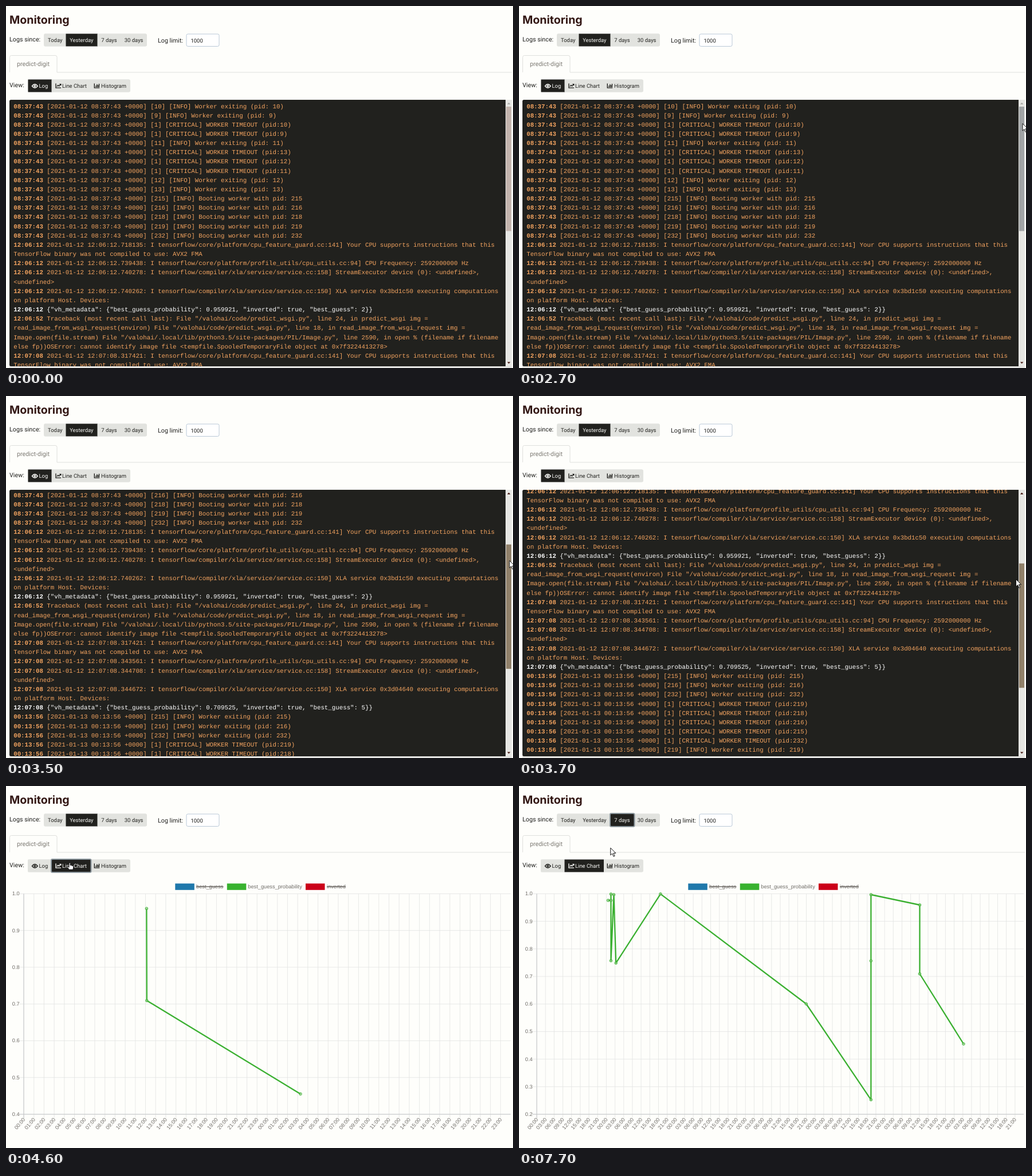
Animation, 885 px wide and 633 px high, one loop 8000 ms. Source, as an HTML page:

```html
<!DOCTYPE html>
<html lang="en">
<head>
<meta charset="utf-8">
<title>Monitoring</title>
<style>
html, body { margin: 0; width: 100%; height: 100%; overflow: hidden; background: #fefefb; }
svg { display: block; position: absolute; left: 0; top: 0; }
text { font-family: Roboto, sans-serif; font-size: 10.75px; fill: #1f1f1d; text-rendering: geometricPrecision; white-space: pre; }
.title { font: 700 19.6px Inter, sans-serif; fill: #331714; }
.muted { fill: #7c7973; }
.btn { color: #22221f; }
.btn rect { fill: #e2e3df; }
.btn text, .input { font-size: 9.45px; }
.btn text { fill: currentColor; }
.btn .ring { fill: none; stroke: #8d989e; stroke-width: 2; visibility: hidden; }
.btn.hover rect { fill: #cad1d5; }
.btn.active { color: #fafaf7; }
.btn.active rect { fill: #21211e; }
.btn .ring.ring { fill: none; }
.btn.focus .ring { visibility: visible; }
.log text { font-family: "Liberation Mono", monospace; font-size: 10.78px; fill: #f4a460; }
.log .out { fill: #fff; }
.log tspan { font-weight: 700; }
.chart text { font-family: "Liberation Sans", Arial, sans-serif; font-size: 9.24px; fill: #706d69; }
.grid { stroke: #e2e4e2; stroke-width: .8; fill: none; }
.axis { stroke: #c3c6c8; stroke-width: 1; fill: none; }
.icon { fill: none; stroke: currentColor; stroke-width: 1.4; }
</style>
</head>
<body>
<svg id="stage" width="885" height="633" viewBox="0 0 885 633">
  <defs><clipPath id="view"><rect x="6" y="164" width="866" height="466"/></clipPath></defs>
  <text class="title" x="6" y="31.3">Monitoring</text>
  <text x="6" y="62.3">Logs since:</text>
  <text x="265" y="63.6">Log limit:</text>
  <rect x="315" y="49" width="57" height="21.5" rx="2.5" fill="#fff" stroke="#b9c8d8"/>
  <text class="input" x="322.5" y="63.8">1000</text>
  <path d="M6.5 116V89.5q0-3 3-3H86q3 0 3 3V116H883" fill="none" stroke="#dfe0dd"/>
  <text class="muted" x="19" y="105.4">predict-digit</text>
  <text x="6" y="141.6">View:</text>
</svg>
<script>
const LOOP = 8000, STEP = 100, BASE = 574, LEFT = 31, RIGHT = 881, TOP = 188.4;
const stage = document.getElementById('stage');

function el(tag, attrs, parent = stage, text) {
  const node = document.createElementNS('http://www.w3.org/2000/svg', tag);
  for (const k in attrs) node.setAttribute(k, attrs[k]);
  if (text !== undefined) node.textContent = text;
  parent.appendChild(node);
  return node;
}
const show = (node, on) => node.setAttribute('visibility', on ? 'visible' : 'hidden');

// Buttons
function button(x, y, w, label, tx, icon) {
  const g = el('g', { class: 'btn' });
  el('rect', { x, y, width: w, height: 22 }, g);
  el('rect', { class: 'ring', x: x - .5, y: y - .5, width: w + 1, height: 23, rx: 2 }, g);
  if (icon) el('path', { class: 'icon', d: icon }, g);
  el('text', { x: tx, y: y + 14.7 }, g, label);
  return g;
}
function bar(x, y, w) {
  el('rect', { x, y, width: w, height: 22, rx: 2.5, fill: '#e2e3df' });
}
bar(66, 48.5, 180);
bar(38, 128.5, 179);
button(67.5, 48.5, 37, 'Today', 73);
const yesterday = button(104.5, 48.5, 55.5, 'Yesterday', 111.2);
const monthBtn = button(200, 48.5, 44, '30 days', 206.8);
const week = button(159.5, 48.5, 41.5, '7 days', 166.3);
const logBtn = button(38.5, 128.5, 41.5, 'Log', 57.5,
  'M45.4 140q4.9-6.4 9.8 0q-4.9 6.4-9.8 0zM49 140a1.3 1.3 0 1 0 2.6 0a1.3 1.3 0 1 0-2.6 0');
button(148, 128.5, 67, 'Histogram', 166,
  'M154.3 135.5v7.6h9M157 141.8v-2.6M158.9 141.8v-5M160.7 141.8v-3.4M162.5 141.8v-5.8');
const lineBtn = button(79.5, 128.5, 68.5, 'Line Chart', 98,
  'M87 135.5v7.6h9M88.8 140.7l2.1-2.3l1.7 1.6l3-3.2M93.4 136.6h2.4v2.4');

// Log panel
const logView = el('g', { class: 'log' });
el('rect', { x: 6, y: 630, width: 877, height: 3, fill: '#e4e4e1' }, logView);
el('rect', { x: 6, y: 164, width: 868, height: 466, rx: 2.5, fill: '#21211e' }, logView);
const rows = el('g', {}, el('g', { 'clip-path': 'url(#view)' }, logView));
let rowCount = 0;

function row(stamp, body, cls = '') {
  body.split('\n').forEach((line, i) => {
    const t = el('text', { class: cls, x: 13.2, y: (178.5 + 16.16 * rowCount++).toFixed(2) }, rows);
    if (!i) el('tspan', {}, t, stamp);
    t.append((i ? '' : ' ') + line);
  });
}
function worker(day, stamp, id, kind, pid = id) {
  const text = { exit: `[INFO] Worker exiting (pid: ${pid})`,
    late: `[CRITICAL] WORKER TIMEOUT (pid:${pid})`,
    boot: `[INFO] Booting worker with pid: ${pid}` }[kind];
  row(stamp, `[2021-01-${day} ${stamp} +0000] [${id}] ${text}`);
}
function startup(stamp, us, addr, result) {
  const pre = i => `2021-01-12 ${stamp}.${us[i]}: I tensorflow/`;
  row(stamp, pre(0) + 'core/platform/cpu_feature_guard.cc:141] Your CPU supports instructions that this\nTensorFlow binary was not compiled to use: AVX2 FMA');
  row(stamp, pre(1) + 'core/platform/profile_utils/cpu_utils.cc:94] CPU Frequency: 2592000000 Hz');
  row(stamp, pre(2) + 'compiler/xla/service/service.cc:158] StreamExecutor device (0): <undefined>,\n<undefined>');
  row(stamp, pre(3) + `compiler/xla/service/service.cc:150] XLA service ${addr} executing computations\non platform Host. Devices:`);
  row(stamp, `{"vh_metadata": {"best_guess_probability": ${result[0]}, "inverted": true, "best_guess": ${result[1]}}}`, 'out');
}
const day1 = (...a) => worker(12, '08:37:43', ...a);
const day2 = (...a) => worker(13, '00:13:56', ...a);
[10, 9].forEach(id => day1(id, 'exit'));
[10, 9].forEach(pid => day1(1, 'late', pid));
day1(11, 'exit');
[13, 12, 11].forEach(pid => day1(1, 'late', pid));
[12, 13].forEach(id => day1(id, 'exit'));
[215, 216, 218, 219, 232].forEach(id => day1(id, 'boot'));
startup('12:06:12', ['718135', '739438', '740278', '740262'], '0x3bd1c50', ['0.959921', 2]);
row('12:06:52', `Traceback (most recent call last): File "/valohai/code/predict_wsgi.py", line 24, in predict_wsgi img =
read_image_from_wsgi_request(environ) File "/valohai/code/predict_wsgi.py", line 18, in read_image_from_wsgi_request img =
Image.open(file.stream) File "/valohai/.local/lib/python3.5/site-packages/PIL/Image.py", line 2590, in open % (filename if filename
else fp))OSError: cannot identify image file <tempfile.SpooledTemporaryFile object at 0x7f3224413278>`);
startup('12:07:08', ['317421', '343561', '344708', '344672'], '0x3d04640', ['0.709525', 5]);
[215, 216, 232].forEach(id => day2(id, 'exit'));
[219, 218, 216, 215, 232].forEach(pid => day2(1, 'late', pid));
day2(219, 'exit');

el('rect', { x: 872, y: 164, width: 11, height: 466, fill: '#e6e6e3' }, logView);
const thumb = el('rect', { x: 873, y: 176, width: 9, height: 217.5 }, logView);
const upArrow = el('path', { d: 'M875 172l2.7-3.2l2.7 3.2z' }, logView);
el('path', { d: 'M875 622.4l2.7 3.2l2.7-3.2z', fill: '#42150f' }, logView);

// Charts
const chart = el('g', { class: 'chart' });
function legend(x, color, name, tx, end) {
  el('rect', { x, y: 170.5, width: 33.5, height: 11.3, fill: color }, chart);
  el('text', { x: tx, y: 178.7 }, chart, name);
  if (end) el('path', { d: `M${tx} 176H${end}`, stroke: '#706d69', 'stroke-width': 1.3 }, chart);
}
legend(295.3, '#1f78ab', 'best_guess', 332, 379.5);
legend(385.8, '#38b22f', 'best_guess_probability', 422.3);
legend(523, '#cb0019', 'inverted', 560, 593);

function axes(min, hours, count) {
  const g = el('g', {}, chart), n = Math.round((1 - min) * 10), dx = (RIGHT - LEFT) / count;
  let d = '';
  for (let i = 0; i <= n; i++) {
    const y = TOP + (BASE - TOP) * i / n;
    d += `M23.3 ${y}H${RIGHT}`;
    el('text', { x: 23.6, y: y + 3, 'text-anchor': 'end' }, g, (1 - i / 10).toFixed(1));
  }
  for (let i = 0; i < count; i++) {
    const x = LEFT + i * dx;
    d += `M${x} ${TOP}V581.5`;
    el('text', { transform: `translate(${x + .3} 581.5) rotate(-50)`, y: 3.2, 'text-anchor': 'end' }, g,
      String(i * hours % 24).padStart(2, '0') + ':00');
  }
  el('path', { class: 'grid', d }, g);
  el('path', { class: 'axis', d: `M${LEFT} ${TOP}V581.5M23.3 ${BASE}H${RIGHT}` }, g);
  return g;
}
const dayAxes = axes(.4, 1, 48), weekAxes = axes(.2, 3, 56);
const dayPoints = [[245.4, 214.2], [245.8, 375.2], [514, 538.5]];
const weekPoints = [[155.5, 200], [160.5, 200], [160.5, 189], [160.5, 305.5], [165.5, 190],
  [169.2, 309.6], [247, 188.8], [501.3, 381], [614.4, 548.6], [614.4, 305.7], [614.4, 190],
  [699.5, 208], [699.5, 328.5], [776, 451]];
const curve = el('g', { stroke: '#3bb031', 'stroke-linejoin': 'round' }, chart);

function plot(points, from, k) {
  const ease = 1 - (1 - Math.min(1, Math.max(0, k))) ** 4;
  const at = points.map(([x, y], i) => {
    const [fx, fy] = from[i] || [x, BASE];
    return [fx + (x - fx) * ease, fy + (y - fy) * ease];
  });
  curve.textContent = '';
  el('path', { d: 'M' + at.join('L'), fill: 'none', 'stroke-width': 2.3 }, curve);
  at.forEach(([cx, cy]) => el('circle', { cx, cy, r: 2.3, fill: '#8ccb84', 'fill-opacity': .6, 'stroke-width': .9 }, curve));
}

// Pointer
const pointer = el('g', { stroke: '#111', 'stroke-linejoin': 'round', fill: '#fff' });
const shapes = {
  arrow: el('path', { d: 'M.5 .5V13.2L3.5 10.4L5.8 15.6L7.8 14.7L5.6 9.7H9.6Z' }, pointer),
  hand: el('path', { d: 'M-1 1.2q1.2-1.5 2.2 0V5.2q1.2-.6 1.8.4q1.3-.6 1.8.5q1.6-.4 1.9 1V9.4L5.8 12.7H-.6L-4.2 8.3q.3-1.6 1.6-.9L-1 8.8Z' }, pointer),
  beam: el('path', { d: 'M-3 .5Q0 .5 0 2V14Q0 15.5-3 15.5M3 .5Q0 .5 0 2M0 14Q0 15.5 3 15.5', style: 'fill:none' }, pointer)
};
// start time, number of steps, end x, end y, linear
const moves = [[700, 1, 141, 115], [800, 1, 282, 102], [1600, 1, 354.5, 95], [1700, 1, 354, 54],
  [2100, 7, 878.5, 205], [2900, 5, 879, 250, 1], [3400, 3, 878, 306, 1], [3700, 1, 867, 320],
  [3800, 4, 190, 111], [4200, 2, 111, 133.5], [5200, 3, 316, 94], [5700, 4, 178, 55],
  [6800, 3, 344, 115], [7500, 3, 159.3, 107.7]];

function position(t) {
  let x = 141, y = 115;
  for (const [start, steps, ex, ey, linear] of moves) {
    if (t < start) break;
    const k = Math.min(1, ((t - start) / STEP + 1) / steps), e = linear ? k : k * k * (3 - 2 * k);
    x += (ex - x) * e;
    y += (ey - y) * e;
  }
  return { x, y };
}
function pointerKind(t) {
  if (t < 700) return '';
  if (t >= 1700 && t < 2100) return 'beam';
  return (t >= 4300 && t < 5200) || (t >= 5900 && t < 6800) ? 'hand' : 'arrow';
}

function draw(t) {
  const isChart = t >= 4400, isWeek = t >= 6600, weekChart = t >= 6700;
  const set = (b, name, on) => b.classList.toggle(name, on);
  set(logBtn, 'active', !isChart);
  set(lineBtn, 'active', isChart);
  set(lineBtn, 'focus', isChart && !isWeek);
  set(lineBtn, 'hover', t === 4300);
  set(yesterday, 'active', !isWeek);
  set(week, 'active', isWeek);
  set(week, 'focus', isWeek);
  set(week, 'hover', t >= 5900 && !isWeek);

  const scroll = t < 2900 ? 0 : (position(Math.min(t, 3700)).y - 205) * 2.183;
  rows.setAttribute('transform', `translate(0 ${-scroll})`);
  thumb.setAttribute('y', 176 + scroll / 2.15);
  thumb.setAttribute('fill', t < 2700 || t > 3700 ? '#c3b4ad' : t < 2900 ? '#a1a4a6' : '#90806a');
  upArrow.setAttribute('fill', scroll ? '#42150f' : '#a9a9a6');
  show(logView, !isChart);
  show(chart, isChart);
  show(dayAxes, isChart && !weekChart);
  show(weekAxes, weekChart);
  if (weekChart) plot(weekPoints, dayPoints, (t - 6600) / 400);
  else plot(dayPoints, [], (t - 4300) / 300);

  const { x, y } = position(t), kind = pointerKind(t);
  pointer.setAttribute('transform', `translate(${x} ${y})`);
  for (const name in shapes) show(shapes[name], name === kind);
}

let last = -1;
function tick(now) {
  const t = Math.floor(now % LOOP / STEP) * STEP;
  if (t !== last) draw(last = t);
  requestAnimationFrame(tick);
}
draw(0);
requestAnimationFrame(tick);
</script>
</body>
</html>
```
